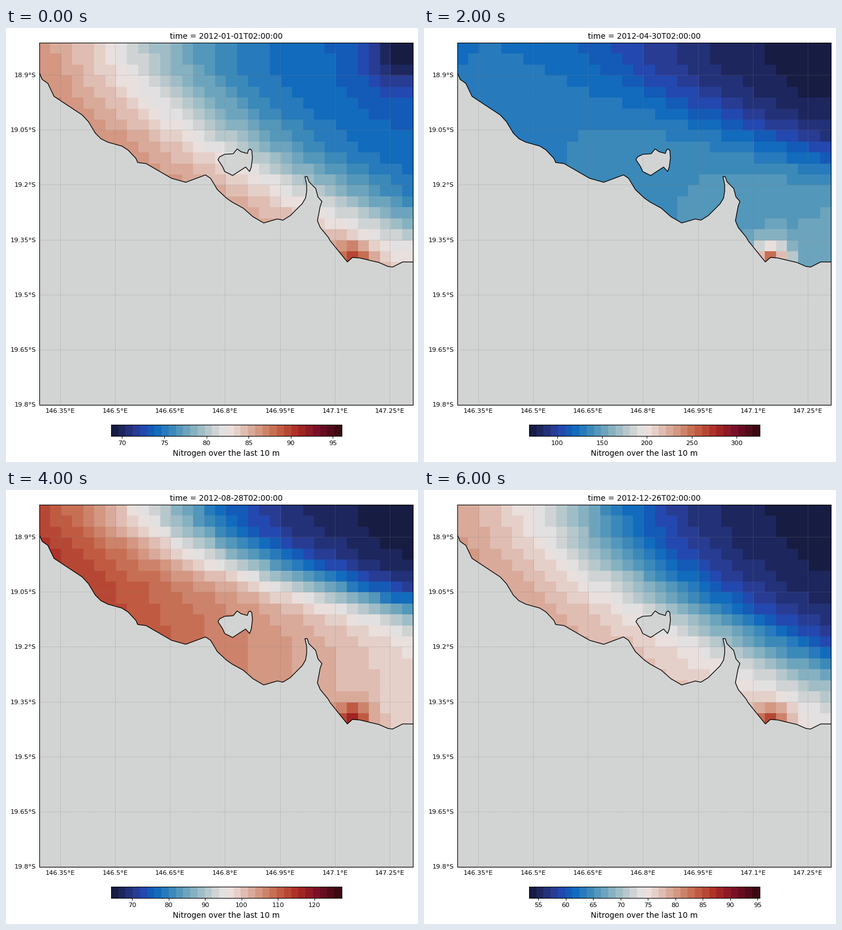
A matplotlib script that plays this animation: 729 px wide and 768 px high, repeating every 6500 ms.

```python
from itertools import count
import numpy as np
import matplotlib.pyplot as plt
from matplotlib.animation import FuncAnimation
from matplotlib.colors import LinearSegmentedColormap

W, H = 729, 768
LEFT, RIGHT, TOP, BOTTOM = 59, 720, 26, 667
COLS, ROWS = 34, 33
STEPS = 13
LAND = "#d2d4d3"
START = np.datetime64("2012-01-01T02:00:00")

plt.rcParams.update({"font.family": "DejaVu Sans", "font.size": 11.4,
                     "axes.linewidth": 1.1})

# Diverging ramp: navy, blue, pale, red, maroon
TONES = [(0, "#171c42"), (1, "#293a8f"), (1.4, "#2447af"), (2, "#0b66bd"),
         (3, "#4590b9"), (4, "#8eb5c2"), (5, "#d2d5d5"), (5.5, "#ece7e7"),
         (6, "#e6d2cc"), (7, "#d59d89"), (8, "#c46548"), (9, "#ac2b24"),
         (10, "#780e28"), (11, "#3c0911")]
CMAP = LinearSegmentedColormap.from_list(
    "diverging", [(p / 11, c) for p, c in TONES]).resampled(32)

# Parameters over the year, linear between the key steps.
# Levels are shares of the colour range, distances are in grid cells.
KEY_STEPS = (0, 3, 5, 7, 9, 11, 12)
YEAR = dict(
    low=(68.7, 69.4, 67.5, 69.98, 58.4, 56.96, 53.3),
    high=(96.04, 430.6, 221.3, 155.4, 99.5, 85.4, 95.4),
    west=(.70, .10, .35, .54, 1.08, 1.03, .66),    # shore level, west end
    east=(.60, .22, .42, .52, .56, .60, .52),      # shore level, east end
    sea=(.18, 0, .03, 0, .04, .04, .02),           # open water level
    front=(9.2, 18.5, 11.7, 14.5, 9.5, 13, 12),    # front at the top row
    bend=(.27, .38, .55, .35, .92, .71, .30),      # how fast it leans east
    plume=(.18, .43, .38, .35, .15, .17, .24),     # strength at the river mouth
)
FRONT_WIDTH = 4.6

COAST = [
    (LEFT, 79), (64, 91), (74, 98), (85, 121), (135, 154), (146, 166),
    (158, 186), (168, 196), (180, 202), (205, 209), (216, 216), (230, 231),
    (233, 238), (248, 240), (293, 266), (318, 273), (353, 260), (362, 266),
    (374, 286), (390, 301), (400, 308), (420, 319), (437, 334), (456, 345),
    (480, 338), (490, 340), (503, 332), (524, 311), (530, 301), (532, 289),
    (532, 277), (529, 263), (533, 263), (536, 272), (548, 284), (552, 299),
    (559, 307), (556, 315), (551, 341), (556, 353), (570, 370), (574, 377),
    (604, 414), (613, 406), (626, 407), (660, 415), (676, 422), (684, 423),
    (702, 414), (RIGHT, 414),
]
ISLAND = [
    (375, 233), (378, 228), (387, 223.5), (402, 222.5), (409, 214), (416, 219),
    (427, 222), (429, 216), (432, 214), (435, 217), (436, 230), (434, 246),
    (431, 254), (424, 246), (401, 261), (387, 254), (383, 245),
]

ROW, COL = np.mgrid[:ROWS, :COLS].astype(float)


def blob(col, row, radius):
    return np.exp(-((COL - col) ** 2 + (ROW - row) ** 2) / (2 * radius ** 2))


def field(west, east, sea, front, bend, plume):
    """A curved front between shore and open water, plus a river plume."""
    shore = west + (east - west) * COL / (COLS - 1)
    offshore = COL - bend * ROW ** 1.6 - front
    mix = 1 / (1 + np.exp(offshore / FRONT_WIDTH))
    level = sea + (shore - sea) * mix
    level *= 1 - blob(COLS - 1, 0, 2.5)
    return np.clip(level + plume * blob(28, 19.3, 1.2), 0, 1)


def pixel_axes(x0, y0, x1, y1):
    return fig.add_axes([x0 / W, 1 - y1 / H, (x1 - x0) / W, (y1 - y0) / H])


def caption(y, text, size):
    return fig.text(390 / W, 1 - y / H, text, ha="center", va="baseline",
                    fontsize=size)


fig = plt.figure(figsize=(W / 72, H / 72), dpi=72, facecolor="white")
image_style = dict(cmap=CMAP, vmin=0, vmax=1, aspect="auto",
                   interpolation="nearest")

# The map uses stage pixels as its coordinates.
sea_map = pixel_axes(LEFT, TOP, RIGHT, BOTTOM)
mesh = sea_map.imshow(np.zeros((ROWS, COLS)),
                      extent=(LEFT, RIGHT, BOTTOM, TOP), **image_style)
mainland = COAST + [(RIGHT + 9, 414), (RIGHT + 9, BOTTOM + 9),
                    (LEFT - 9, BOTTOM + 9), (LEFT - 9, 79)]
for outline in (mainland, ISLAND):
    sea_map.fill(*zip(*outline), facecolor=LAND, edgecolor="black",
                 linewidth=1.3, joinstyle="round")
sea_map.set(xlim=(LEFT, RIGHT), ylim=(BOTTOM, TOP))
sea_map.set_xticks([95.7 + 97.25 * i for i in range(7)],
                   [f"{146.35 + 0.15 * i:.5g}°E" for i in range(7)])
sea_map.set_yticks([83 + 97.2 * i for i in range(7)],
                   [f"{18.9 + 0.15 * i:.4g}°S" for i in range(7)])
sea_map.tick_params(length=0, pad=6)
sea_map.set_axisbelow(False)
sea_map.grid(color="gray", linewidth=0.8, linestyle=(0, (1, 1)), alpha=0.6)

bar = pixel_axes(186, 702, 594, 722)
ramp = bar.imshow(np.linspace(0, 1, 32)[None], **image_style)
bar.set_yticks([])
bar.tick_params(axis="x", length=4, width=1, pad=4)

title = caption(19, "", 13.65)
caption(757.5, "Nitrogen over the last 10 m", 13.6)


def draw(step):
    now = {name: np.interp(step, KEY_STEPS, keys) for name, keys in YEAR.items()}
    low, high = now.pop("low"), now.pop("high")
    mesh.set_data(field(**now))
    ramp.set_extent((low, high, 0, 1))
    bar.set_xlim(low, high)
    title.set_text(f"time = {START + np.timedelta64(30 * step, 'D')}")
    return mesh, ramp, title


anim = FuncAnimation(fig, draw, frames=STEPS, interval=500, repeat=True,
                     repeat_delay=0, blit=False)
plt.show()
```
